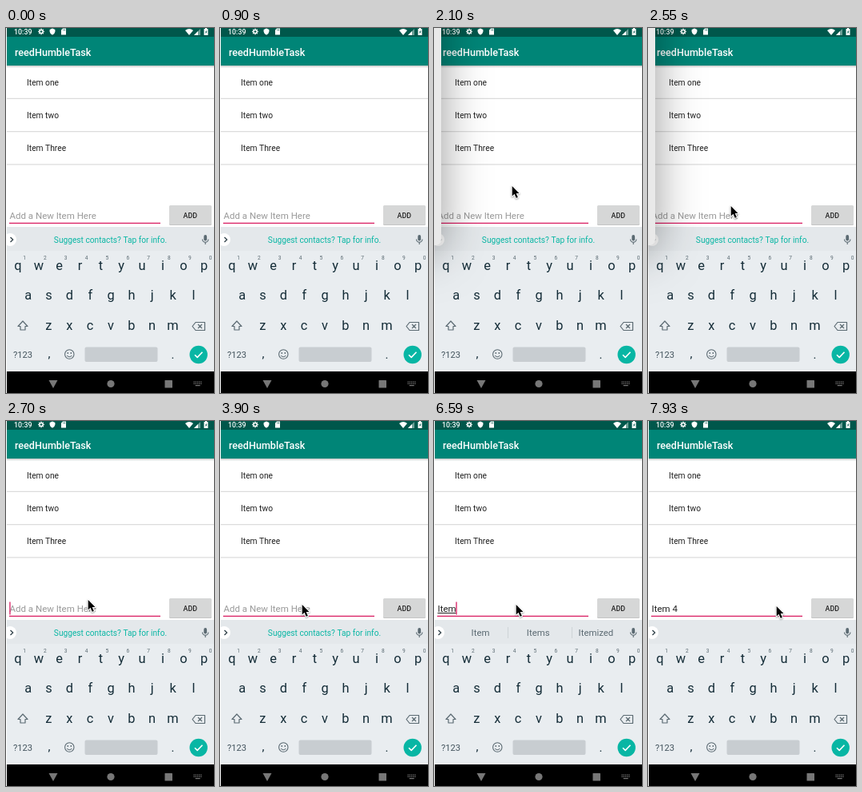
These frames come from a looping animation (260x457 px, 8000 ms). An HTML page with a canvas:

```html
<!DOCTYPE html>
<html lang="en">
<head>
<meta charset="utf-8">
<title>Todo list</title>
<style>
  html, body { margin: 0; width: 100%; height: 100%; overflow: hidden; background: #fff; }
  canvas { display: block; width: 260px; height: 457px; }
</style>
</head>
<body>
<canvas id="stage" width="260" height="457"></canvas>
<script>
const ctx = document.getElementById('stage').getContext('2d');
const LOOP = 8000;
const PINK = '#d81b60', TEAL = '#08b6a4', KEY = '#152d38', ICON = '#5b6a72';

// Each track lists [start time, value]; a value holds until the next start.
const pointerTrack = [
  [0, null], [1950, [74, 172]], [2100, [95, 196]], [2250, [112, 205]],
  [2400, [119, 208]], [2550, [101, 221]], [2700, [100, 222]], [3000, [100, 228]],
  [7780, [138, 230]], [7930, [158, 230]]
];
const typedTrack = [[0, ''], [5990, 'I'], [6140, 'It'], [6440, 'Ite'], [6590, 'Item'], [6890, 'Item '], [7180, 'Item 4']];
const caretTrack = [
  [0, false], [450, true], [900, false], [1350, true], [1800, false], [2250, true],
  [3000, false], [3450, true], [3900, false], [4500, true], [4950, false], [5390, true], [7630, false]
];
const hintsTrack = [
  [0, ['Suggest contacts? Tap for info.']], [6140, ['It', "It's", 'Its']], [6440, ['Ite', 'Item', 'Its']],
  [6590, ['Item', 'Items', 'Itemized']], [6890, ['is', 'in', 'I']], [7180, []]
];
const at = (track, t) => track.reduce((value, [start, next]) => t >= start ? next : value, null);
const between = (t, from, to) => t >= from && t < to;

function text(str, x, y, size, color, align = 'left', weight = 400) {
  ctx.font = `${weight} ${size}px Roboto, sans-serif`;
  ctx.textAlign = align;
  ctx.fillStyle = color;
  ctx.fillText(str, x, y);
}

function rect(x, y, w, h, color, radius = 0) {
  ctx.fillStyle = color;
  ctx.beginPath();
  ctx.roundRect(x, y, w, h, radius);
  ctx.fill();
}

function disc(x, y, r, color) {
  ctx.fillStyle = color;
  ctx.beginPath();
  ctx.arc(x, y, r, 0, Math.PI * 2);
  ctx.fill();
}

function path(d, { x = 0, y = 0, fill, stroke, width = 1 }) {
  const shape = new Path2D(d);
  ctx.save();
  ctx.translate(x, y);
  ctx.lineJoin = 'round';
  if (stroke) {
    ctx.strokeStyle = stroke;
    ctx.lineWidth = width;
    ctx.stroke(shape);
  }
  if (fill) {
    ctx.fillStyle = fill;
    ctx.fill(shape);
  }
  ctx.restore();
}

function statusBar(fullSignal) {
  rect(1, 0, 259, 11, '#00574b');
  text('10:39', 10, 8, 8.85, '#fff', 'left', 500);
  disc(44, 4.5, 2.8, '#fff');
  for (let i = 0; i < 8; i++) {
    const a = i * Math.PI / 4;
    disc(44 + 3.2 * Math.cos(a), 4.5 + 3.2 * Math.sin(a), 0.8, '#fff');
  }
  disc(44, 4.5, 1.3, '#00574b');
  path('M0 -4L3.4 -2.6V0Q3 3 0 4.2Q-3 3 -3.4 0V-2.6Z', { x: 58, y: 4.5, fill: '#fff' });
  path('M-1 -4H3V4H-3V-2Z', { x: 72, y: 4.5, fill: '#fff' });
  rect(71.5, 1.5, 0.7, 2, '#00574b');
  rect(73, 1.5, 0.7, 2, '#00574b');
  path('M0 8L-5 2Q0 -2 5 2Z', { x: 229, y: 1, fill: '#fff' });
  path('M0 8H8V0Z', { x: 235, y: 1, fill: fullSignal ? '#fff' : '#6b9e96' });
  path('M0 8H5V3Z', { x: 235, y: 1, fill: '#fff' });
  rect(247.5, 1, 5, 8, '#fff', 0.6);
  rect(249, 0, 2, 1, '#fff');
  path('M1 0L-1.2 3H0L-.6 5L1.5 2H.3Z', { x: 250, y: 2.5, fill: '#00574b' });
}

function appBar() {
  const shade = ctx.createLinearGradient(0, 47, 0, 50);
  shade.addColorStop(0, '#c4c4c4');
  shade.addColorStop(1, '#fff');
  rect(1, 47, 259, 3, shade);
  rect(1, 11, 259, 36, '#008577');
  text('reedHumbleTask', 11, 34.5, 12.6, '#fff', 'left', 500);
}

function list() {
  ['Item one', 'Item two', 'Item Three'].forEach((label, i) => {
    text(label, 26, 72 + i * 41.2, 10.25, '#222');
    rect(1, 87.7 + i * 41.3, 259, 1.2, '#dcdcdc');
  });
}

function inputRow(t) {
  const typed = at(typedTrack, t);
  text(typed || 'Add a New Item Here', 4.5, 239, 11.5, typed ? '#222' : '#999');
  const end = 4.5 + (typed ? ctx.measureText(typed).width : 0);
  if (between(t, 5990, 6890)) rect(4.5, 240, end - 4.5, 1, '#222');
  if (at(caretTrack, t)) rect(end - 0.2, 226.5, 1.3, 16, PINK);
  rect(4, 243.7, 189, 1.3, PINK);
  rect(204, 223, 53, 24, '#c4c4c4', 1.5);
  rect(204, 222, 53, 24, '#d6d7d7', 1.5);
  text('ADD', 230.3, 237.5, 8.85, '#222', 'center', 500);
}

function suggestions(t) {
  rect(1, 249, 259, 30, '#e4e8eb');
  disc(5, 265, 8, '#fff');
  rect(0, 255, 1, 20, '#fff');
  path('M5.5 262L8.7 265L5.5 268', { stroke: '#37474f', width: 1.4 });
  const words = at(hintsTrack, t);
  if (words.length === 1) text(words[0], 130.5, 268.7, 10.2, TEAL, 'center');
  if (words.length === 3) {
    words.forEach((word, i) => text(word, 58 + 72.2 * i, 269, 11.4, ICON, 'center'));
    rect(92, 258, 1, 14, '#cdd3d6');
    rect(172, 258, 1, 14, '#cdd3d6');
  }
  rect(247.3, 259, 3.8, 7.5, ICON, 1.9);
  path('M245.5 264.5A3.7 3.7 0 0 0 252.9 264.5M249.2 268.2V271', { stroke: ICON, width: 1.1 });
}

function keyboard() {
  rect(1, 279, 259, 151, '#e9edf0');
  const row = (keys, x, y) => [...keys].forEach((key, i) => text(key, x + i * 25.85, y, 16.4, KEY, 'center'));
  row('qwertyuiop', 15, 303);
  row('asdfghjkl', 27.7, 340);
  row('zxcvbnm', 53.4, 377.7);
  [...'1234567890'].forEach((n, i) => text(n, 23 + i * 25.85, 290.3, 6.6, ICON, 'center'));

  path('M0 -6L6 .5H3V5H-3V.5H-6Z', { x: 21, y: 373, stroke: ICON, width: 1.2 });
  path('M-8 0L-4 -5H7.5V5H-4ZM-1 -2.5L4 2.5M4 -2.5L-1 2.5', { x: 241, y: 373.5, stroke: ICON, width: 1.2 });

  text('?123', 21, 412.7, 11.2, '#43545d', 'center');
  text(',', 54, 413, 15, KEY, 'center');
  text('.', 208.5, 413.5, 15, KEY, 'center');
  path('M5.7 0A5.7 5.7 0 1 1 -5.7 0A5.7 5.7 0 1 1 5.7 0M-3 1.5Q0 5 3 1.5', { x: 79.3, y: 408.5, stroke: ICON, width: 1.1 });
  disc(77.3, 407, 0.9, ICON);
  disc(81.3, 407, 0.9, ICON);
  rect(98.5, 399.5, 91, 18.5, '#c8cdd1', 2);
  disc(240.7, 409, 11.2, TEAL);
  path('M-4.5 .2L-1.3 3.4L5 -3.2', { x: 240.5, y: 409, stroke: '#fff', width: 1.6 });
}

function navBar() {
  rect(1, 430, 259, 27, '#000');
  path('M53.5 441H64.5L59 451Z', { fill: '#777' });
  disc(131, 445.5, 4.6, '#777');
  rect(198.5, 441, 9.5, 9.5, '#777', 0.5);
  for (let i = 0; i < 5; i++) {
    rect(234.5 + i * 2.2, 442.5, 1.3, 1.3, '#777');
    rect(234.5 + i * 2.2, 444.7, 1.3, 1.3, '#777');
  }
  rect(236.7, 447, 6, 1.2, '#777');
}

function slidePanel() {
  ctx.save();
  ctx.shadowColor = 'rgba(0, 0, 0, 0.4)';
  ctx.shadowBlur = 56;
  ctx.shadowOffsetY = 8;
  rect(-200, -60, 209, 332, '#e9e9e9', 7);
  ctx.restore();
}

function pointer([x, y]) {
  ctx.save();
  ctx.shadowColor = 'rgba(0, 0, 0, 0.35)';
  ctx.shadowBlur = 2;
  ctx.shadowOffsetY = 1;
  const arrow = 'M0 0V12.4L2.8 9.8L5 14.8L7.2 13.9L5 9H8.8Z';
  path(arrow, { x: x + 2.7, y: y + 2, stroke: '#fff', width: 2.2 });
  ctx.restore();
  path(arrow, { x: x + 2.7, y: y + 2, fill: '#000' });
}

function draw(t) {
  rect(0, 0, 260, 457, '#fff');
  statusBar(between(t, 6140, 6590));
  appBar();
  list();
  inputRow(t);
  suggestions(t);
  keyboard();
  navBar();
  if (between(t, 1200, 2700)) slidePanel();
  const spot = at(pointerTrack, t);
  if (spot) pointer(spot);
}

const start = performance.now();
function tick() {
  draw((performance.now() - start) % LOOP);
  requestAnimationFrame(tick);
}
tick();
</script>
</body>
</html>
```
